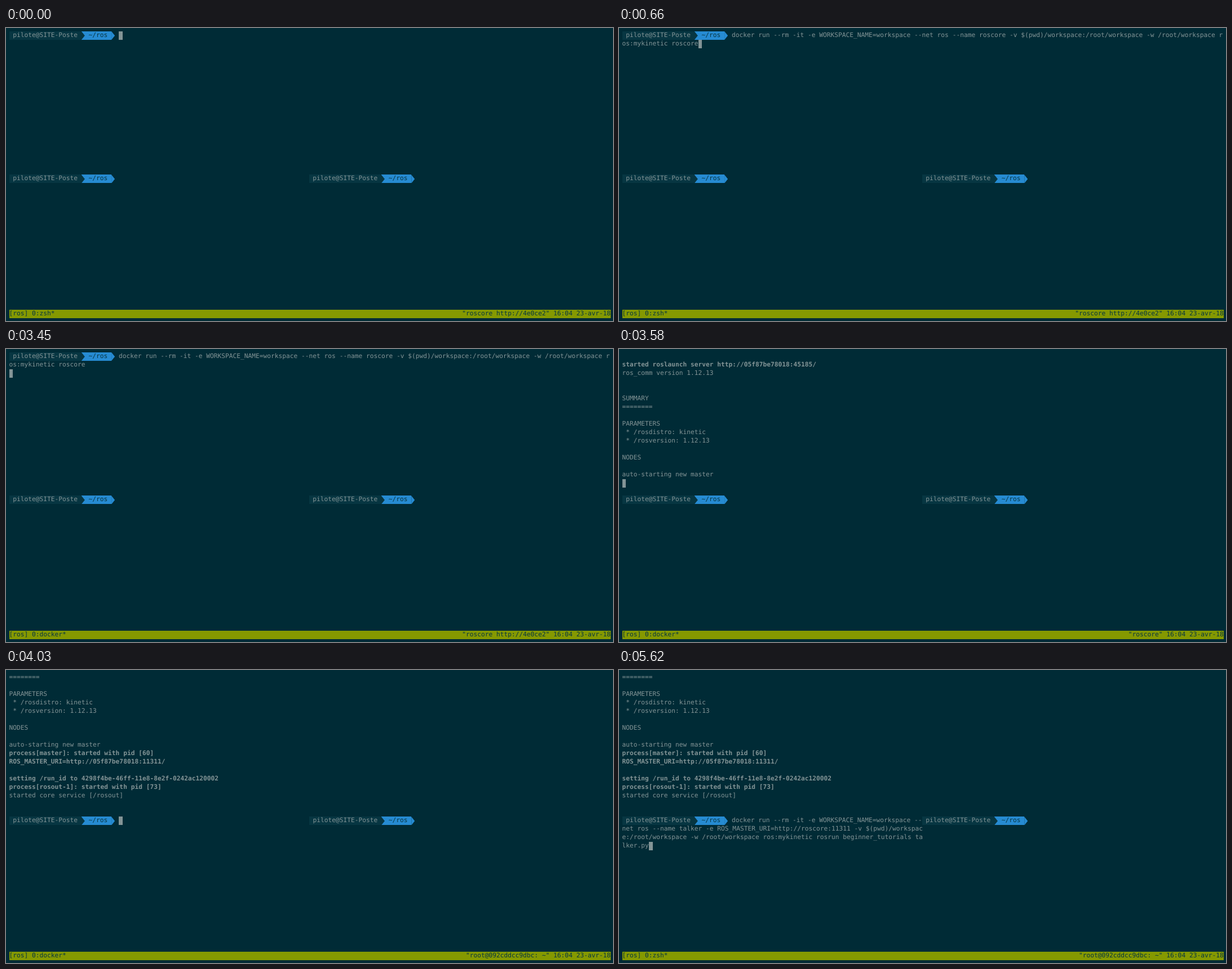
These frames come from a looping animation (1077 by 520 pixels, 8 s). An HTML page:

```html
<!DOCTYPE html>
<html lang="en">
<head>
<meta charset="utf-8">
<title>Terminal session</title>
<style>
  :root { --row: 14.97px; --bg: #002b36; --fg: #839496; --dark: #073642; --blue: #268bd2; }
  html, body { margin: 0; width: 100%; height: 100%; overflow: hidden; background: var(--bg); }
  #screen {
    position: absolute; left: 5.5px; top: 6px;
    font: 11.22px/var(--row) "DejaVu Sans Mono", monospace;
    text-rendering: geometricPrecision;
    font-variant-ligatures: none;
    color: var(--fg); white-space: pre;
  }
  #screen > div { height: var(--row); }
  #screen span { display: inline-block; height: var(--row); vertical-align: top; }
  #screen .user { background: var(--dark); }
  #screen .path { background: var(--blue); color: var(--dark); }
  #screen .inverse { background: var(--fg); color: var(--bg); }
  #screen .status { background: #859900; color: var(--dark); }
  #screen .arrow { width: 6px; }
  #screen .arrow::before {
    content: ""; display: block; height: 100%;
    background: var(--tip); clip-path: polygon(0 0, 100% 50%, 0 100%);
  }
  #screen .first { --tip: var(--dark); background: var(--blue); }
  #screen .last { --tip: var(--blue); }
</style>
</head>
<body>
<div id="screen"></div>
<script>
const LOOP = 8000, COLS = 158, PANE = 79, PROMPT = 29, TOP_ROWS = 16, BOTTOM = 17, STATUS = 33;
const screen = document.getElementById('screen');

const span = (cls, text = '') => `<span class="${cls}">${text}</span>`;
const inverse = text => span('inverse', text);
const cursor = inverse(' ');
const prompt = span('user', ' pilote@SITE-Poste ') + span('arrow first') +
  span('path', ' ~/ros ') + span('arrow last') + ' ';

const workspace = '-v $(pwd)/workspace:/root/workspace -w /root/workspace ros:mykinetic';
const docker = 'docker run --rm -it -e WORKSPACE_NAME=workspace --net ros --name';
const coreCommand = `${docker} roscore ${workspace} roscore`;
const talkerCommand = `${docker} talker -e ROS_MASTER_URI=http://roscore:11311 ${workspace} rosrun beginner_tutorials talker.py`;

// Lines starting with "!" are bold.
const log = `
!started roslaunch server http://05f87be78018:45185/
ros_comm version 1.12.13


SUMMARY
========

PARAMETERS
 * /rosdistro: kinetic
 * /rosversion: 1.12.13

NODES

auto-starting new master
!process[master]: started with pid [60]
!ROS_MASTER_URI=http://05f87be78018:11311/

!setting /run_id to 4298f4be-46ff-11e8-8e2f-0242ac120002
!process[rosout-1]: started with pid [73]
started core service [/rosout]`.split('\n')
  .map(line => line[0] === '!' ? `<b>${line.slice(1)}</b>` : line);

// A prompt line with its command wrapped to the pane width.
function shell(cols, command = '', mode = 'idle') {
  const text = mode === 'pasted' ? command + ' ' : command;
  const parts = [text.slice(0, cols - PROMPT)];
  for (let i = cols - PROMPT; i < text.length; i += cols) parts.push(text.slice(i, i + cols));
  const rows = parts.map(part => mode === 'pasted' ? inverse(part) : part);
  if (mode === 'typing') rows[rows.length - 1] += cursor;
  const used = parts[0].length + (mode === 'typing' && parts.length === 1 ? 1 : 0);
  rows[0] = prompt + rows[0] + ' '.repeat(cols - PROMPT - used);
  return rows;
}

function output(added, active = true) {
  const end = log.length - 6 + added;
  return [...log.slice(end - TOP_ROWS + 1, end), active ? cursor : ''];
}

const idle = shell(PANE);
const oldTitle = 'roscore http://4e0ce2', rootTitle = 'root@092cddcc9dbc: ~';
const scene = (at, top, left, job, title) => ({ at, top, left, job, title });
const scenes = [
  scene(0, shell(COLS, '', 'typing'), idle, 'zsh', oldTitle),
  scene(530, shell(COLS, coreCommand, 'pasted'), idle, 'zsh', oldTitle),
  scene(660, shell(COLS, coreCommand, 'typing'), idle, 'zsh', oldTitle),
  scene(3120, [...shell(COLS, coreCommand), cursor], idle, 'zsh', oldTitle),
  scene(3450, [...shell(COLS, coreCommand), cursor], idle, 'docker', oldTitle),
  scene(3580, output(0), idle, 'docker', 'roscore'),
  scene(3710, output(2), idle, 'docker', 'roscore'),
  scene(3810, output(4), idle, 'docker', 'roscore'),
  scene(3920, output(6), idle, 'docker', 'roscore'),
  scene(4030, output(6, false), shell(PANE, '', 'typing'), 'docker', rootTitle),
  scene(5290, output(6, false), shell(PANE, talkerCommand, 'pasted'), 'zsh', rootTitle),
  scene(5620, output(6, false), shell(PANE, talkerCommand, 'typing'), 'zsh', rootTitle)
];

function draw({ top, left, job, title }) {
  const rows = Array(STATUS + 1).fill('');
  top.forEach((row, i) => rows[i] = row);
  left.forEach((row, i) => rows[BOTTOM + i] = row);
  rows[BOTTOM] += prompt;
  const name = `[ros] 0:${job}*`;
  rows[STATUS] = span('status', name + `"${title}" 16:04 23-avr-18`.padStart(COLS - name.length));
  screen.innerHTML = rows.map(row => `<div>${row}</div>`).join('');
}

const start = performance.now();
let shown;
function tick() {
  const time = (performance.now() - start) % LOOP;
  const current = scenes.findLast(s => s.at <= time);
  if (current !== shown) draw(shown = current);
  requestAnimationFrame(tick);
}
tick();
</script>
</body>
</html>
```
